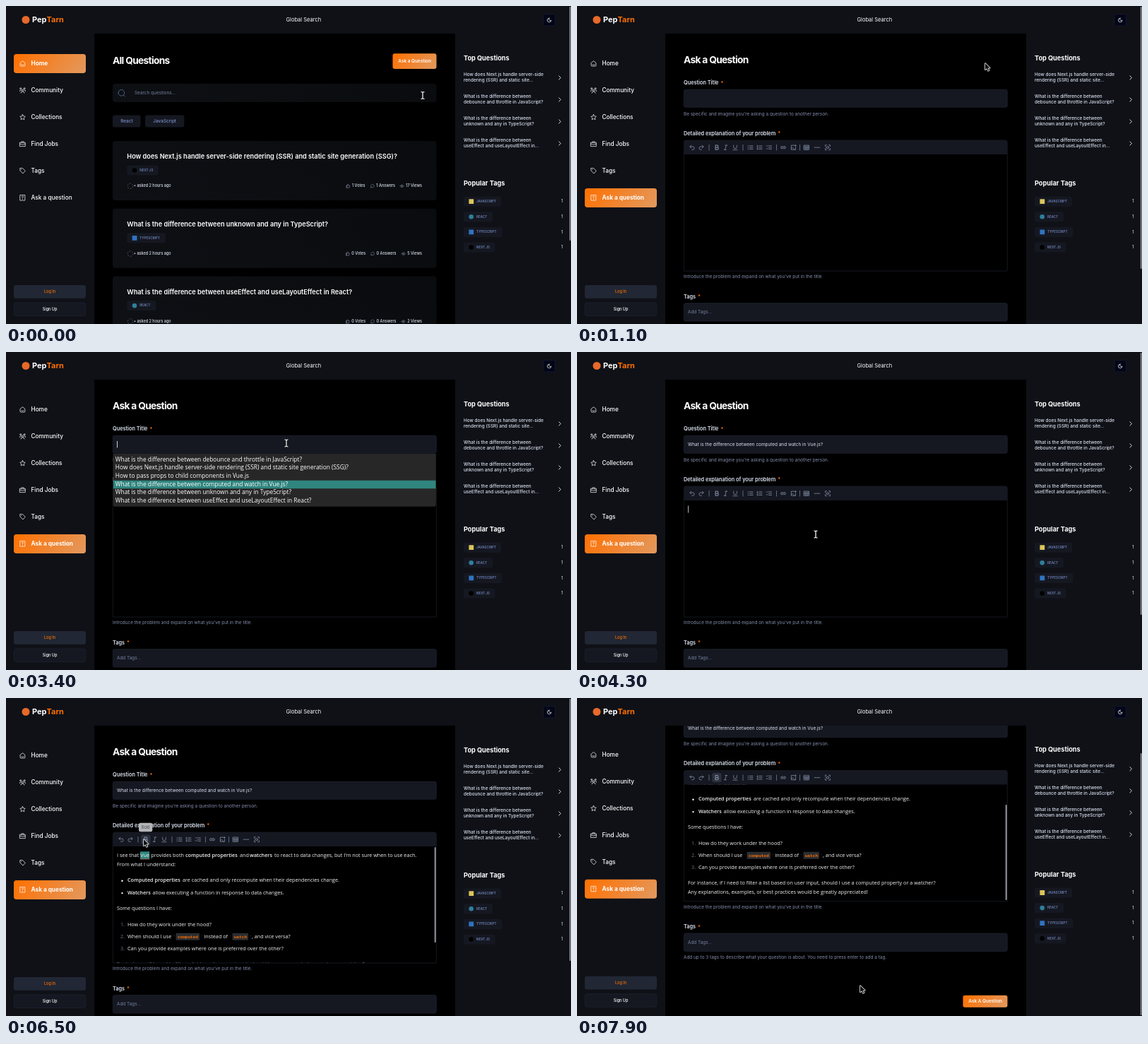
Animation of 800 by 450 pixels, one loop 8 s. Source, as an HTML page with a canvas:

```html
<!DOCTYPE html>
<html lang="en">
<head>
<meta charset="utf-8">
<title>Question board</title>
<style>
  html, body { margin: 0; width: 100%; height: 100%; overflow: hidden; background: #000; }
  canvas { display: block; width: 800px; height: 450px; }
</style>
</head>
<body>
<canvas id="stage"></canvas>
<script>
const canvas = document.getElementById('stage');
const ratio = window.devicePixelRatio || 1;
canvas.width = 800 * ratio;
canvas.height = 450 * ratio;
const ctx = canvas.getContext('2d');

const LOOP = 8000, TICK = 100;
const DESK = 2.4; // text is laid out at 1920 px wide, then scaled down
const UI = 'Inter, sans-serif', BODY = '"Open Sans", "Noto Sans", sans-serif', MONO = '"Liberation Mono", monospace';
const PANEL = '#0f1117', FIELD = '#151821', LINE = '#212734', ORANGE = '#ff7000';
const WHITE = '#ffffff', SOFT = '#dce3f1', BLUE = '#7b8ec8', MUTED = '#858ead', TEAL = '#30857f';
// Inter sizes: 10, 12, 14, 16, 18, 20 and 30 css px, zoomed
const XS = 4.58, S = 5.5, M = 6.42, L = 7.33, XL = 8.25, H3 = 9.17, H1 = 13.75;

const ICONS = {
  home: 'M4 10l8-6.5 8 6.5v9.5a1.5 1.5 0 0 1-1.5 1.5h-13a1.5 1.5 0 0 1-1.5-1.5zM8 16q4 3 8 0',
  people: 'M9 12a3 3 0 1 0 6 0a3 3 0 1 0-6 0M6 21q0-5 6-5t6 5M3 6a2 2 0 1 0 5 0a2 2 0 1 0-5 0M16 6a2 2 0 1 0 5 0a2 2 0 1 0-5 0M2 15q0-4 4-4M22 15q0-4-4-4',
  star: 'M12 3l2.8 5.8 6.2.9-4.5 4.4 1.1 6.3-5.6-3-5.6 3 1.1-6.3L3 9.7l6.2-.9z',
  work: 'M3 7h18v13H3zM8 7V4h8v3M3 12q9 4 18 0',
  tag: 'M4 3h8l9 9-8 9-9-9zM8 7.5v.5',
  ask: 'M4 3h16v18H4zM9.5 9.5q0-3 2.5-3t2.5 2.5q0 1.5-2.5 3v1.5M12 17v.5',
  undo: 'M9 14L4 9l5-5M4 9h10.5a5.5 5.5 0 0 1 0 11H11',
  redo: 'M15 14l5-5-5-5M20 9H9.5a5.5 5.5 0 0 0 0 11H13',
  bold: 'M7 4h6a4 4 0 0 1 0 8H7zM7 12h7a4 4 0 0 1 0 8H7z',
  italic: 'M10 4h8M6 20h8M14 4l-4 16',
  under: 'M6 4v6a6 6 0 0 0 12 0V4M4 21h16',
  bullets: 'M9 6h12M9 12h12M9 18h12M3 6h2M3 12h2M3 18h2',
  numbers: 'M10 6h11M10 12h11M10 18h11M4 4v5M3 9h3M3 14h3l-3 5h3',
  checks: 'M11 6h10M11 12h10M11 18h10M2 6l2 2 4-4M2 16l2 2 4-4',
  link: 'M10 8H7a4 4 0 0 0 0 8h3M14 8h3a4 4 0 0 1 0 8h-3M8 12h8',
  image: 'M14 4H4v16h16v-9M4 17l5-5 8 8M19 2v6M16 5h6',
  table: 'M3 4h18v16H3zM3 9h18M3 14h18M9 9v11M15 9v11',
  rule: 'M2 12h20',
  frame: 'M3 8V3h5M16 3h5v5M21 16v5h-5M8 21H3v-5M8 9h8v6H8z',
  thumb: 'M7 10v11H3V10zM7 10l4-8q3 0 2.5 3L13 9h8l-2 12H7',
  chat: 'M4 20l1-4a8.5 8.5 0 1 1 3 3z',
  eye: 'M2 12q10-14 20 0q-10 14-20 0M9 12a3 3 0 1 0 6 0a3 3 0 1 0-6 0',
  search: 'M2 11a9 9 0 1 0 18 0a9 9 0 1 0-18 0M18 18l4 4',
  chevron: 'M9 5l7 7-7 7',
  moon: 'M12 3a6 6 0 0 0 9 9 9 9 0 1 1-9-9z'
};

const MENU = [['Home', 'home'], ['Community', 'people'], ['Collections', 'star'],
  ['Find Jobs', 'work'], ['Tags', 'tag'], ['Ask a question', 'ask']];
const TOP = [['How does Next.js handle server-side', 'rendering (SSR) and static site...'],
  ['What is the difference between', 'debounce and throttle in JavaScript?'],
  ['What is the difference between', 'unknown and any in TypeScript?'],
  ['What is the difference between', 'useEffect and useLayoutEffect in...']];
const TECH = {
  'JAVASCRIPT': { w: 53, color: '#dcc65a' },
  'REACT': { w: 41, color: '#2f7f9c', round: true },
  'TYPESCRIPT': { w: 54.5, color: '#2f74c0' },
  'NEXT.JS': { w: 44.5, color: '#000', round: true }
};
const CARDS = [
  ['How does Next.js handle server-side rendering (SSR) and static site generation (SSG)?', 'NEXT.JS', 1, 1, 17],
  ['What is the difference between unknown and any in TypeScript?', 'TYPESCRIPT', 0, 0, 5],
  ['What is the difference between useEffect and useLayoutEffect in React?', 'REACT', 0, 0, 2]];
const CHOICE = 'What is the difference between computed and watch in Vue.js?';
const OPTIONS = ['What is the difference between debounce and throttle in JavaScript?', CARDS[0][0],
  'How to pass props to child components in Vue.js', CHOICE, CARDS[1][0], CARDS[2][0]];
const TOOLS = [['undo', 163], ['redo', 176], ['|', 187], ['bold', 198], ['italic', 210.5], ['under', 224],
  ['|', 235], ['bullets', 245.5], ['numbers', 258.5], ['checks', 272], ['|', 282.5], ['link', 292],
  ['image', 306.5], ['|', 315.5], ['table', 325], ['rule', 340], ['frame', 355]];

// pointer hot spot: time, x, y
const POINTER = [[0, 590, 126.5], [100, 590, 126.5], [500, 578, 81], [1300, 578, 81], [1600, 397, 129],
  [3900, 397, 129], [4300, 338, 258], [5300, 338, 258], [5700, 197, 224], [5900, 197, 224],
  [6200, 195, 200], [6800, 195, 200], [7100, 300, 290], [7400, 300, 290], [7700, 401, 407]];
const EDITOR_SCROLL = [[4870, 27.5], [5300, 0], [7100, 0], [7400, 27.5]];
const PAGE_SCROLL = [[7700, 0], [7900, 87.5]];

const smooth = p => p * p * (3 - 2 * p);

function track(keys, t, i = 1) {
  if (t <= keys[0][0]) return keys[0][i];
  for (let k = 1; k < keys.length; k++) {
    const a = keys[k - 1], b = keys[k];
    if (t <= b[0]) return a[i] + (b[i] - a[i]) * smooth((t - a[0]) / (b[0] - a[0]));
  }
  return keys[keys.length - 1][i];
}

// draws one line centred on y and returns its width
function text(str, x, y, size, color, weight = 400, align = 'left', font = UI, spacing = 0) {
  ctx.save();
  ctx.translate(x, y);
  ctx.scale(1 / DESK, 1 / DESK);
  ctx.font = `${weight} ${size * DESK}px ${font}`;
  ctx.letterSpacing = spacing * size * DESK + 'px';
  ctx.textAlign = align;
  ctx.fillStyle = color;
  ctx.fillText(str, 0, 0);
  const width = ctx.measureText(str).width / DESK;
  ctx.restore();
  return width;
}

const heading = (str, x, y) => text(str, x, y, H1, WHITE, 700, 'left', UI, -0.05);

function box(x, y, w, h, r, fill, stroke) {
  ctx.beginPath();
  ctx.roundRect(x, y, w, h, r);
  if (fill) { ctx.fillStyle = fill; ctx.fill(); }
  if (stroke) { ctx.strokeStyle = stroke; ctx.lineWidth = 0.6; ctx.stroke(); }
}

function dot(x, y, r, color) {
  ctx.beginPath();
  ctx.arc(x, y, r, 0, 7);
  ctx.fillStyle = color;
  ctx.fill();
}

function gradient(x, y, w, h, deg, from, to) {
  const a = deg * Math.PI / 180, dx = Math.sin(a), dy = -Math.cos(a);
  const half = (Math.abs(w * dx) + Math.abs(h * dy)) / 2, cx = x + w / 2, cy = y + h / 2;
  const g = ctx.createLinearGradient(cx - dx * half, cy - dy * half, cx + dx * half, cy + dy * half);
  g.addColorStop(0, from);
  g.addColorStop(1, to);
  return g;
}

const warmBox = (x, y, w, h, r) => box(x, y, w, h, r, gradient(x, y, w, h, 129, ORANGE, '#e2995f'));
const darkBox = (x, y, w, h, r) =>
  box(x, y, w, h, r, gradient(x, y, w, h, 232, 'rgba(23,28,35,.41)', 'rgba(19,22,28,.7)'));

function icon(name, x, y, size, color, width = 1.8) {
  const k = size / 24;
  ctx.save();
  ctx.translate(x - size / 2, y - size / 2);
  ctx.scale(k, k);
  ctx.strokeStyle = color;
  ctx.lineWidth = width;
  ctx.lineCap = ctx.lineJoin = 'round';
  ctx.stroke(new Path2D(ICONS[name]));
  ctx.restore();
}

function clip(x, y, w, h, draw) {
  ctx.save();
  ctx.beginPath();
  ctx.rect(x, y, w, h);
  ctx.clip();
  draw();
  ctx.restore();
}

function techPill(name, x, y) {
  const { w, color, round } = TECH[name];
  box(x, y - 7, w, 14, 2.5, FIELD);
  if (round) dot(x + 10.7, y, 3.3, color);
  else box(x + 7.4, y - 3.4, 6.8, 6.8, 0.5, color);
  text(name, x + 18, y, XS, BLUE, 500);
}

function header() {
  box(0, 0, 800, 39, 0, PANEL);
  dot(28, 19.5, 5.5, '#e8692a');
  const w = text('Pep', 37, 19.7, 11, WHITE, 700);
  text('Tarn', 37 + w, 19.7, 11, ORANGE, 700);
  text('Global Search', 421.3, 19.7, 7.5, WHITE, 400, 'center');
  box(761, 11.7, 16.5, 16.5, 2.5, '#020617', '#1b2340');
  icon('moon', 769.2, 20, 7.5, WHITE, 2.2);
}

function leftPanel(active) {
  MENU.forEach(([label, name], i) => {
    const y = 81.3 + i * 38, on = i === active;
    if (on) warmBox(11, y - 13.4, 102, 27, 3.7);
    icon(name, 23.5, y, 10, WHITE, 1.7);
    text(label, 35.5, y, XL, WHITE, on ? 700 : 500);
  });
  box(11, 395, 102, 18.7, 3, LINE);
  text('Log In', 62, 404.4, S, ORANGE, 500, 'center');
  box(11.3, 420, 101.4, 18.5, 3, FIELD, LINE);
  text('Sign Up', 62, 429.3, S, WHITE, 500, 'center');
}

function rightPanel() {
  text('Top Questions', 648, 74, H3, WHITE, 700);
  TOP.forEach((lines, i) => {
    const y = 97.5 + i * 31;
    lines.forEach((s, j) => text(s, 648, y + j * 8, M, SOFT, 500));
    icon('chevron', 784, y + 4, 9, WHITE, 2.2);
  });
  text('Popular Tags', 648, 251, H3, WHITE, 700);
  Object.keys(TECH).forEach((name, i) => {
    const y = 276.7 + i * 21.6;
    techPill(name, 648, y);
    text('1', 787.5, y, S, SOFT, 500, 'center');
  });
}

function metric(name, label, right, y) {
  const w = text(label, right, y, S, SOFT, 500, 'right');
  icon(name, right - w - 5.5, y, 6.5, '#9aa5c0', 1.8);
}

function card([title, tag, votes, answers, views], y) {
  darkBox(151, y, 458.5, 84, 4);
  text(title, 171.3, y + 22.3, H3, WHITE, 600);
  techPill(tag, 171.3, y + 41.5);
  const my = y + 63.8, dx = views > 9 ? 0 : 1.5;
  ctx.setLineDash([2.2, 1.8]);
  ctx.beginPath();
  ctx.arc(176, my, 3.8, 0, 7);
  ctx.strokeStyle = '#70747c';
  ctx.lineWidth = 0.6;
  ctx.stroke();
  ctx.setLineDash([]);
  text('• asked 2 hours ago', 181, my, S, SOFT, 500);
  metric('thumb', votes + ' Votes', 508.5 + dx / 2, my);
  metric('chat', answers + ' Answers', 551 + dx, my);
  metric('eye', views + ' Views', 589, my);
}

function homePage() {
  heading('All Questions', 151, 78.3);
  warmBox(547.5, 67.3, 62, 21.7, 3);
  text('Ask a Question', 578.6, 78.4, M, WHITE, 600, 'center');
  darkBox(151, 110, 458.5, 26, 4);
  icon('search', 163.8, 123.3, 11.5, '#5c6f9c', 1.7);
  text('Search questions...', 182, 123.3, M, '#75809f');
  box(151, 154.5, 39.5, 17, 2.7, FIELD);
  text('React', 170.9, 163, M, BLUE, 500, 'center');
  box(197, 154.5, 55.3, 17, 2.7, FIELD);
  text('JavaScript', 224.7, 163, M, BLUE, 500, 'center');
  CARDS.forEach((c, i) => card(c, 191 + i * 95.8));
}

function label(str, y) {
  const w = text(str, 151, y, L, SOFT, 600);
  text('*', 151 + w + 3, y + 0.5, L, ORANGE, 600);
}

function body(str, x, y, weight = 400, color = '#f2f2f2') {
  text(str, x, y, 7.25, color, weight, 'left', BODY);
}

function code(str, x, w, y) {
  const mono = (s, sx, color) => text(s, sx, y + 0.3, 6, color, 700, 'left', MONO);
  mono('`', x - 5, '#5a4030');
  mono('`', x + w + 1, '#5a4030');
  box(x - 0.5, y - 5, w + 0.5, 10, 1.2, '#2b2d31');
  mono(str, x + 2, ORANGE);
}

function squiggle(x, y, w) {
  ctx.beginPath();
  for (let i = 0; i <= w; i += 0.5) ctx.lineTo(x + i, y + 0.6 * Math.sin(i * 2.2));
  ctx.strokeStyle = '#d8502c';
  ctx.lineWidth = 0.8;
  ctx.stroke();
}

function article(t, scroll) {
  const y = 222.7 - scroll;
  if (t >= 5800) box(190, y - 5.5, 13.2, 11, 0, TEAL);
  body('I see that', 157, y);
  body('Vue', 190.2, y, t >= 6600 ? 600 : 400);
  squiggle(190.5, y + 5.2, 12.5);
  body('provides both', 205.3, y);
  body('computed properties', 254, y, 600);
  body('and', 331, y);
  body('watchers', 345, y, 600);
  body("to react to data changes, but I'm not sure when to use each.", 380, y);
  body('From what I understand:', 157, y + 13);
  dot(164.5, y + 36, 1.2, WHITE);
  body('Computed properties', 172, y + 35.6, 600);
  body('are cached and only recompute when their dependencies change.', 250, y + 35.6);
  dot(164.5, y + 53.4, 1.2, WHITE);
  body('Watchers', 172, y + 53, 600);
  body('allow executing a function in response to data changes.', 207.5, y + 53);
  body('Some questions I have:', 157, y + 75.5);
  [98, 115, 132].forEach((dy, i) => body(i + 1 + '.', 162, y + dy, 400, '#6b7280'));
  body('How do they work under the hood?', 172, y + 98);
  body('When should I use', 172, y + 115);
  code('computed', 241, 33, y + 115);
  body('instead of', 280.5, y + 115);
  code('watch', 321, 22, y + 115);
  body(', and vice versa?', 348, y + 115);
  body('Can you provide examples where one is preferred over the other?', 172, y + 132);
  body('For instance, if I need to filter a list based on user input, should I use a computed property or a watcher?', 157, y + 154.6);
  body('Any explanations, examples, or best practices would be greatly appreciated!', 157, y + 167.5);
}

function editor(t) {
  box(151.3, 190, 458, 185, [3, 3, 0, 0], '#000', LINE);
  box(151.3, 190, 458, 20, [3, 3, 0, 0], FIELD);
  if (t >= 6200) box(191.3, 193.5, 13.2, 13.2, 2, '#2b303c');
  for (const [name, x] of TOOLS) {
    if (name === '|') box(x - 0.4, 196, 0.8, 8.5, 0, '#6f7a94');
    else icon(name, x, 200.2, 9.3, '#8a95b0', name === 'bold' ? 2.6 : 1.9);
  }
  if (t >= 4500) {
    const scroll = track(EDITOR_SCROLL, t);
    clip(152, 210.3, 457, 164.3, () => article(t, scroll));
    box(606.8, 211 + scroll, 1.8, 135, 0.9, '#a3a5aa');
  } else if (t >= 4300) box(157, 217.5, 0.7, 10, 0, WHITE);
}

const menuOpen = t => t >= 2000 && t < 3800;

function dropdown(t) {
  box(151.5, 144, 457.3, 74.7, [0, 0, 3, 3], '#272727');
  const pick = t < 2700 ? -1 : Math.min(3, Math.floor((t - 2700) / 200));
  OPTIONS.forEach((s, i) => {
    const y = 152.4 + i * 11.72;
    if (i === pick) box(151.8, y - 5.9, 456.7, 11.7, 0, TEAL);
    text(s, 154.8, y, 8.38, WHITE, 400, 'left', BODY);
  });
  if (t < 2700) box(605.5, 146, 2, 37, 1, '#484848');
}

function askPage(t) {
  heading('Ask a Question', 151, 77.3);
  label('Question Title', 108.8);
  box(151.3, 118.3, 458, 25, 2.5, FIELD, LINE);
  if (t >= 3800) text(CHOICE, 157, 130.8, M, SOFT);
  text("Be specific and imagine you're asking a question to another person.", 151, 152.6, M, MUTED);
  label('Detailed explanation of your problem', 180.5);
  editor(t);
  text("Introduce the problem and expand on what you've put in the title.", 151, 383.5, M, MUTED);
  label('Tags', 411.6);
  box(151.3, 420.5, 458, 25.5, 2.5, FIELD, LINE);
  text('Add Tags...', 157, 433.3, M, '#75809f');
  text('Add up to 3 tags to describe what your question is about. You need to press enter to add a tag.', 151, 455, M, MUTED);
  warmBox(546.5, 508.3, 63, 17, 2.7);
  text('Ask A Question', 578.2, 516.8, M, WHITE, 600, 'center');
  if (t >= 1800 && t < 3800) box(157, 126, 0.8, 9.5, 0, WHITE);
  if (menuOpen(t)) dropdown(t);
  if (t >= 6300 && t < 6900) {
    box(188, 176.7, 19.3, 12.5, 2.5, '#b4b5b9');
    text('Bold', 197.6, 183, S, '#44464c', 400, 'center');
  }
}

function pointer(t, home) {
  const x = track(POINTER, t, 1), y = track(POINTER, t, 2);
  const beam = home ? y > 110 : t < 7700 && ((y > 118 && y < 144) || (y > 211 && y < 375));
  const shape = new Path2D(beam
    ? 'M-2.5-5q2 0 2.5 1q.5-1 2.5-1M0-4v8M-2.5 5q2 0 2.5-1q.5 1 2.5 1'
    : 'M0 0v9.3l2.2-2 1.7 3.6 1.5-.7-1.7-3.5h3.1z');
  ctx.save();
  ctx.translate(x, y);
  ctx.lineJoin = 'round';
  ctx.strokeStyle = beam ? '#111' : WHITE;
  ctx.lineWidth = beam ? 2.6 : 1.5;
  ctx.stroke(shape);
  if (beam) {
    ctx.strokeStyle = WHITE;
    ctx.lineWidth = 1.2;
    ctx.stroke(shape);
  } else {
    ctx.fillStyle = '#111';
    ctx.fill(shape);
  }
  ctx.restore();
}

function draw(t) {
  const home = t < 800, scroll = track(PAGE_SCROLL, t), part = scroll / 87.5;
  ctx.setTransform(ratio, 0, 0, ratio, 0, 0);
  ctx.textBaseline = 'middle';
  box(0, 0, 800, 450, 0, PANEL);
  box(125, 39, 511, 411, 0, '#000');
  clip(125, 39, 511, 411, () => {
    ctx.translate(0, -scroll);
    if (home) homePage();
    else askPage(t);
  });
  ctx.save();
  ctx.translate(0, -1.2 * part);
  leftPanel(home ? 0 : 5);
  rightPanel();
  ctx.restore();
  header();
  // the open menu locks the page and hides its scrollbar
  if (!menuOpen(t)) box(797.8, 1 + 77 * part, 1.8, home ? 331 : 371, 0.9, '#8f9096');
  pointer(t, home);
}

function loop() {
  const t = performance.now() % LOOP;
  draw(Math.floor(t / TICK) * TICK);
  requestAnimationFrame(loop);
}
loop();
</script>
</body>
</html>
```
